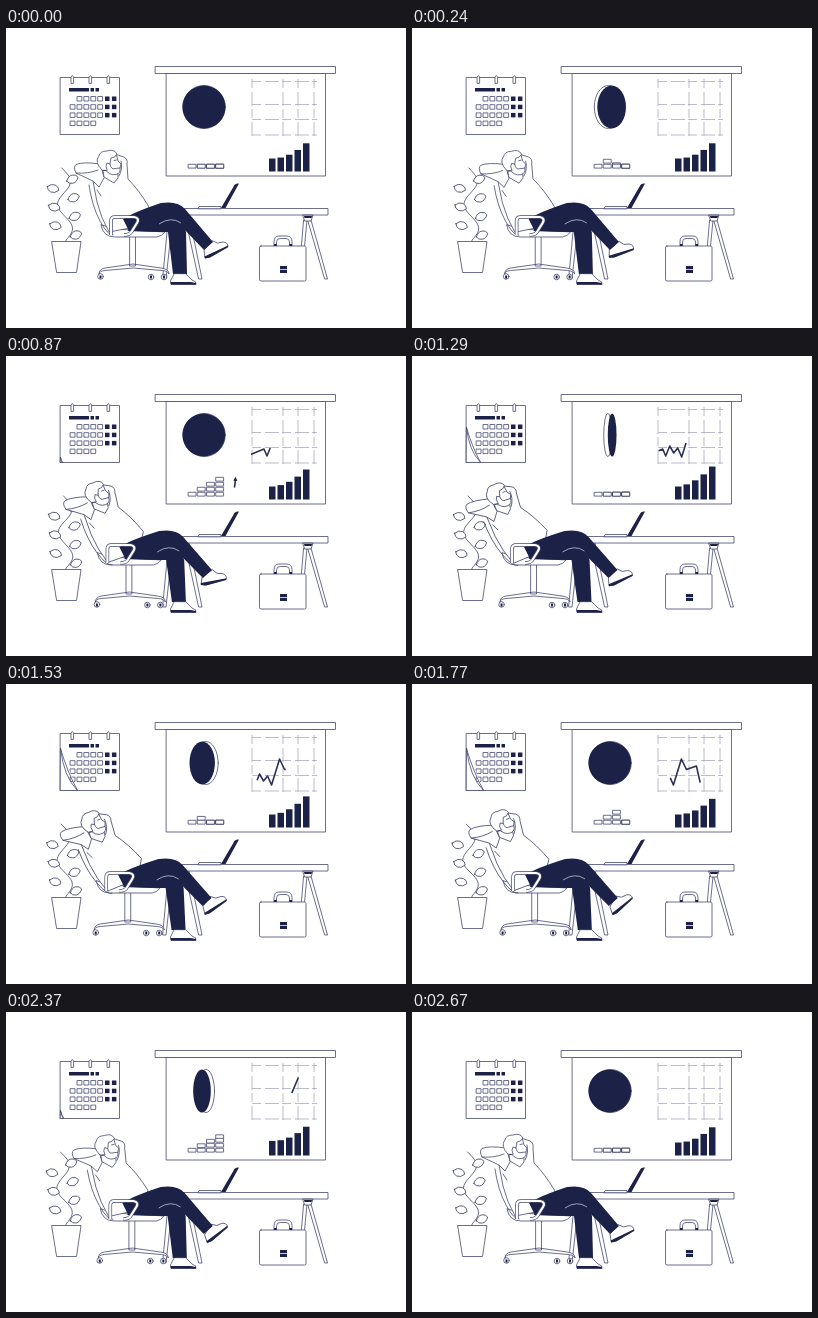
An HTML page for the animation above (2.7 s loop, 400 px wide and 300 px high).

```html
<!DOCTYPE html>
<html lang="en">
<head>
<meta charset="utf-8">
<title>Office break</title>
<style>
  html, body { margin: 0; width: 100%; height: 100%; overflow: hidden; background: #fff; }
  svg { display: block; width: 100vw; height: 100vh; }
  .line { fill: #fff; stroke: #474b70; stroke-width: .8; stroke-linejoin: round; stroke-linecap: round; }
  .open { fill: none; }
  .dark { fill: #1c2148; stroke: none; }
  .grid { fill: none; stroke: #a9abbd; stroke-width: .8; stroke-dasharray: 9 4 14 3; }
  .ink { fill: none; stroke: #2b3055; stroke-width: 1.6; stroke-linejoin: round; }
</style>
</head>
<body>
<svg viewBox="0 0 400 300">
  <defs>
    <clipPath id="gridClip"><rect x="245" y="48" width="74" height="62"/></clipPath>
    <path id="arm" d="M105 207V193Q105 189 109 189H128Q134 190 131 195L126 203Q124 207 118 207"/>
  </defs>

  <g class="line">
    <rect x="54.5" y="49.500" width="59" height="57"/>
    <g id="days"></g>
    <path id="curl"/>
    <path d="M65 55v-6q1.300-3 2.600 0v6zM83 55v-6q1.300-3 2.600 0v6zM101 55v-6q1.300-3 2.600 0v6z"/>
  </g>
  <path class="dark" d="M63 60h20v3.500h-20zM84.500 60h3.500v3.500h-3.500zM89.500 60h3.500v3.500h-3.500z"/>

  <g class="line">
    <rect x="160.500" y="45.500" width="159" height="102.500"/>
    <rect x="149.500" y="38.500" width="180" height="7"/>
  </g>
  <path class="grid" d="M246 51v58M277 51v58M292 51v58M308 51v58M246 53.500h65M246 76.500h65M246 91.500h65M246 107h65"/>
  <g clip-path="url(#gridClip)">
    <path id="trend" class="ink"
      d="M238.500 101 258 93 261 100 265 90 269 97 273 92 277 101 285 75 290 85.500 300 82 304 99.500 319 64"/>
  </g>
  <ellipse id="coinBack" class="line" cy="79" ry="21.500"/>
  <ellipse id="coin" class="dark" cy="79" ry="21.500"/>
  <g id="stacks" class="line"></g>
  <path id="arrow" class="ink" d="M223 139Q230 138 229.500 115"/>
  <path id="arrowHead" class="dark" d="M2 0-2-2v4z"/>
  <g id="bars" class="dark"></g>

  <g id="plant" class="line">
    <path id="stem" class="open"/>
    <g id="leaves"></g>
  </g>
  <path class="line" d="M46 213.500h29l-4.500 31h-19.500z"/>

  <g class="line">
    <path d="M163 187h4l-7 64h-3zM179 187h4l13 64h-3zM298 192h3l-5.500 58.500h-2.500zM302 192h3l16.500 59h-2.500z"/>
    <path d="M157 180.500h165v6.500h-165zM297 187h10l-2 6h-6z"/>
    <path d="M192 180.500l1-2h22v2z"/>
    <path class="dark" d="M298 188h8l-.500 2h-7zM215 180 228.500 157q1-2 4.500-1.500L219.500 180z"/>
    <path class="open" d="M268 218v-4q0-6 5-6h8q5 0 5 6v4M270.500 218v-4q0-3.500 3.500-3.500h6q3.500 0 3.500 3.500v4"/>
    <rect x="253.500" y="218" width="46.500" height="35" rx="1.500"/>
    <path class="dark" d="M274 238h7v3.200h-7zM274 242h7v3h-7zM268 216h2.500v2h-2.500zM283.500 216h2.500v2h-2.500z"/>
  </g>

  <g id="chair" class="line">
    <path d="M124 208h5.500v30h-5.500zM93 246q0-5 6-6l28-4 28 4q8 1 8 6-1-3-7-3.500l-29-2.500-28 2.500q-6 .500-6 3.500z"/>
    <circle cx="94.500" cy="248.500" r="2.800"/><circle cx="145" cy="249" r="2.800"/><circle cx="158" cy="249" r="2.800"/>
    <path class="dark" d="M93.500 247.500h2v3h-2zM144 247.500h2v3h-2zM157 247.500h2v3h-2z"/>
    <path d="M95 197q2 12 14 12h42q5-1 8-5l-50-3z"/>
  </g>

  <g id="torso" class="line">
    <path class="open" d="M83 157Q86 178 94 193T107 207"/>
    <path d="M109 126 118 129Q122 131 121 136L122 151Q133 162 143 179L135 198 103 204Q95 190 91 174L87 153 96 146z"/>
    <path d="M94 136Q77 133.500 70 136.500 67 139 70 145L87 153 93 159 98 150z"/>
    <path class="open" d="M70 145Q82 146 92 142M115 133Q117 141 113 148M91 162 95 168"/>
    <path d="M97 143 98 149 108 155 112 150V143z"/>
    <path d="M98 140Q103 148 110 146.500 115 145 114 140L115 136 112 133 110 125 100 127z"/>
    <path d="M96 142Q88 134 93 128 94 123 101 123 108 120.500 111 126 109 130 105 130L104 136 101 135Q99 138 101 142z"/>
    <path class="open" d="M104 136Q105 142 109 140.500L114 140M108 132.500l2.500-.500"/>
  </g>

  <path id="lowerLeg" class="dark"/>
  <g class="line">
    <path d="M168 246 164.500 253 165 256.500h25q1-3-4-4.500l-6-6z"/>
    <path class="dark" d="M164.500 254h20l5.500 1v1.500h-25z"/>
  </g>
  <g id="foot" class="line">
    <path d="M206 213 198 222 199 230 204 229 222 219Q222 214 217 214L212 215z"/>
    <path class="dark" d="M198.500 228.500 222 217.500V219L204 229.500 199 230.500z"/>
  </g>
  <path id="upperLeg" class="dark"/>
  <path id="crease" fill="none" stroke="#aeb1c6" stroke-width=".9"/>
  <g id="armrest" fill="none">
    <use href="#arm" stroke="#474b70" stroke-width="3.600"/>
    <use href="#arm" stroke="#fff" stroke-width="2.200"/>
  </g>
</svg>

<script>
const LOOP = 2700;
const $ = id => document.getElementById(id);
const set = (el, attrs) => { for (const k in attrs) el.setAttribute(k, attrs[k]); };
const add = (parent, tag, attrs) => {
  const el = document.createElementNS('http://www.w3.org/2000/svg', tag);
  set(el, attrs);
  return parent.appendChild(el);
};
const show = on => on ? 'visible' : 'hidden';
const ramp = (t, from, to) => Math.min(1, Math.max(0, (t - from) / (to - from)));
const ease = (t, from, to) => { const u = ramp(t, from, to); return u * u * (3 - 2 * u); };
const bump = (t, from, to) => Math.sin(Math.PI * ramp(t, from, to)) ** 2;
const trim = (el, from, to) => set(el, {
  'stroke-dasharray': `0 ${from} ${Math.max(0, to - from)} 999`,
  visibility: show(to > from)
});

for (let row = 0; row < 4; row++)
  for (let col = row ? 0 : 1; col < (row < 3 ? 7 : 4); col++)
    add($('days'), 'rect', {
      x: 64.5 + col * 6.9, y: 68.5 + row * 8.2, width: 4.5, height: 4.5,
      ...(col > 4 && { class: 'dark' })
    });

// Twining stem with leaves on alternate sides
let stem = 'M60 214';
for (let y = 212; y >= 140; y -= 2)
  stem += `L${60 + 7 * Math.sin((212 - y) / 7.5) - (212 - y) / 24} ${y}`;
set($('stem'), { d: stem });
for (let i = 0; i < 7; i++) {
  const side = i % 2 ? -1 : 1;
  add($('leaves'), 'path', {
    d: 'M-6 0Q-3-4.500 1-4T6 0Q3 4.500-1 4T-6 0z',
    transform: `translate(${60 + side * 10 - i * .6} ${207 - i * 9.3}) rotate(${side * -18})`
  });
}

const boxes = [];
for (let col = 0; col < 4; col++)
  for (let level = col; level >= 0; level--)
    boxes.push({ col, level, el: add($('stacks'), 'rect', { x: 182.5 + col * 9.2, width: 7.5, height: 3.8 }) });

const bars = Array.from({ length: 5 }, (_, i) => add($('bars'), 'rect', { x: 263 + i * 8.5, width: 6.5 }));

function drawCalendar(t) {
  const k = ease(t, 700, 1500) - ease(t, 1900, 2550);
  const top = 106.5 - 42 * k, right = 54.5 + 17 * k;
  set($('curl'), {
    d: `M54.500 ${top}Q${54.5 + 3 * k} ${106.5 - 14 * k} ${right} 106.500H54.500z` +
       `M54.500 ${top}Q${54.5 + 7 * k} ${106.5 - 18 * k} ${right} 106.500`,
    visibility: show(k > 0)
  });
}

function drawCoin(t) {
  let turn = Math.PI * t / 900 % Math.PI;
  if (turn > Math.PI / 2) turn -= Math.PI;
  const rx = Math.max(2, 21.5 * Math.cos(turn)), depth = 2.2 * Math.sin(turn);
  set($('coin'), { cx: 198 + depth, rx });
  set($('coinBack'), { cx: 198 - depth, rx: rx - .3 });
}

function drawCharts(t) {
  set($('trend'), { transform: `translate(${(870 - t) * .0173} 0)` });
  trim($('trend'), 168 * ramp(t, 480, 2450) ** 2.6, 168 * ramp(t, 380, 2100) ** 1.2);

  const rise = ramp(t, 330, 1000), tip = 23 * rise;
  trim($('arrow'), 23 * rise ** 4, tip);
  const p = $('arrow').getPointAtLength(tip), q = $('arrow').getPointAtLength(tip + 1);
  const angle = Math.atan2(q.y - p.y, q.x - p.x) * 180 / Math.PI;
  set($('arrowHead'), {
    transform: `translate(${p.x} ${p.y}) rotate(${angle})`,
    visibility: show(rise > 0 && rise < 1)
  });

  const phase = t % (LOOP / 2);
  for (const { col, level, el } of boxes) {
    const start = 50 * col * col;
    const height = col * (ease(phase, start, start + 190) - ease(phase, 950, 1310));
    set(el, { y: 136.3 - Math.min(level, height) * 5 });
  }
  bars.forEach((bar, i) => {
    const y = 130.5 - .95 * i * i - 1.2 * i * bump(t, 600, 1900) - (7.5 - 1.2 * i) * bump(t, 1770, 2480);
    set(bar, { y, height: 143.5 - y });
  });
}

function drawMan(t) {
  const cycle = 2 * Math.PI * t / LOOP;
  const lean = (1 - Math.cos(cycle)) / 2, shift = -5 * lean;
  const slide = `translate(${shift} 0)`;
  set($('chair'), { transform: slide });
  set($('armrest'), { transform: slide });
  set($('torso'), { transform: `${slide} rotate(${-12.5 * lean} 120 190)` });
  set($('plant'), { transform: `rotate(${1.5 * Math.sin(cycle)} 60 213)` });

  const hip = 118 + shift, knee = 172 + shift * .5, ankle = shift * .3;
  set($('lowerLeg'), {
    d: `M${hip + 4} 203L${hip + 8} 192 ${knee - 4} 186Q${knee + 4} 190 ${knee + 8} 204L${181 + ankle} 246H${167 + ankle}L${knee - 10} 204z`
  });
  set($('upperLeg'), {
    d: `M${hip - 1} 191Q${hip + 10} 184 ${knee - 17} 175Q${knee} 172.500 ${knee + 7} 181L${207 + ankle} 214 ${198 + ankle} 222 ${knee + 5} 200 ${knee - 12} 204 ${hip + 5} 203z`
  });
  set($('crease'), { d: `M${knee - 19} 196Q${knee - 7} 188 ${knee + 3} 195` });
  set($('foot'), { transform: `translate(${ankle} 0) rotate(${16 * Math.sin(cycle)} 203 218)` });
}

function frame(now) {
  const t = now % LOOP;
  drawCalendar(t);
  drawCoin(t);
  drawCharts(t);
  drawMan(t);
  requestAnimationFrame(frame);
}
frame(0);
</script>
</body>
</html>
```
